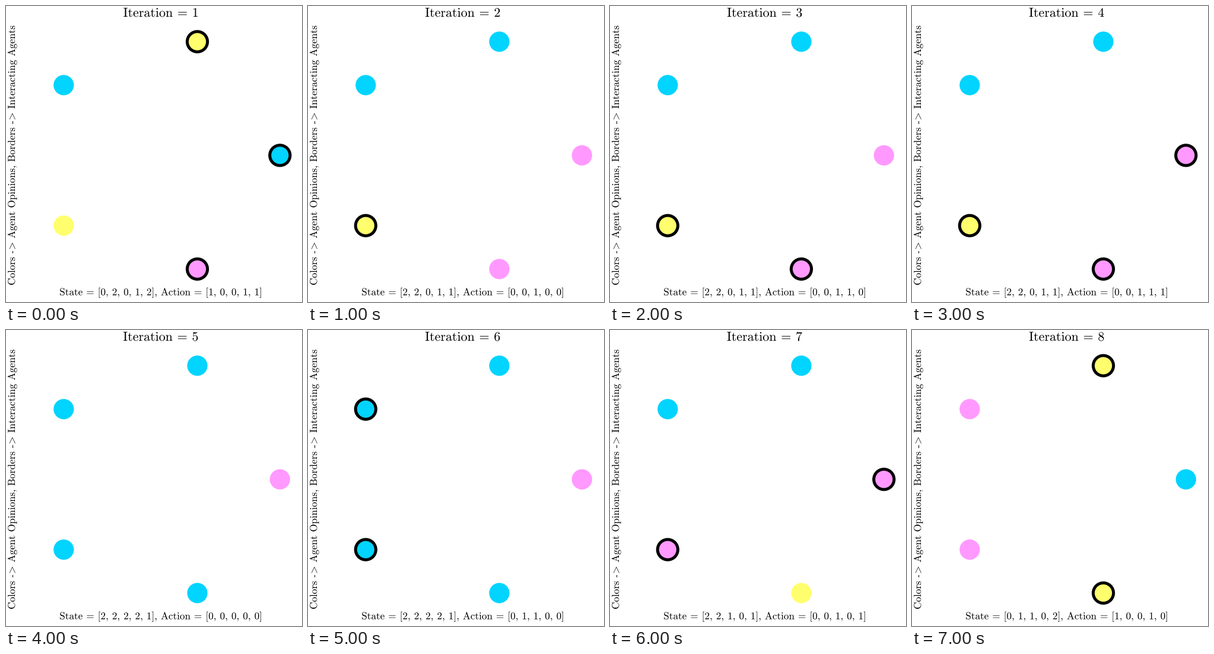
Recreate the animation shown at these times as a matplotlib script. Size 499 by 499 pixels, loop 8000 ms.

```python
import matplotlib.pyplot as plt
import numpy as np
from matplotlib.animation import FuncAnimation
from matplotlib.patches import Circle, PathPatch
from matplotlib.path import Path
from matplotlib.textpath import TextPath
from matplotlib.transforms import Affine2D

plt.rcParams["mathtext.fontset"] = "cm"
plt.rcParams["mathtext.default"] = "rm"

SIZE, DPI = 499, 100
CENTER, RING = (260.3, 251.8), 201.5
RADIUS, BORDER = 17.1, 5
TITLE_SIZE, LABEL_SIZE = 22, 17.17
YELLOW, PINK, CYAN = range(3)
COLORS = ["#ffff6d", "#ff99ff", "#00d4ff"]

# agents, counterclockwise from the top right
A, B, C, D, E = range(5)
START = {A: YELLOW, B: CYAN, C: YELLOW, D: PINK, E: CYAN}
# opinions that change when an iteration begins
SWITCHES = {
    2: {A: CYAN, E: PINK},
    5: {C: CYAN, D: CYAN},
    7: {C: PINK, D: YELLOW},
    8: {A: YELLOW, B: PINK, E: CYAN},
}
INTERACTING = [{A, D, E}, {C}, {C, D}, {C, D, E}, set(), {B, C}, {C, E}, {A, D}]

fig = plt.figure(figsize=(SIZE / DPI, SIZE / DPI), dpi=DPI, facecolor="white")
ax = fig.add_axes([0, 0, 1, 1])
ax.set_xlim(0, SIZE)
ax.set_ylim(SIZE, 0)
ax.axis("off")


def text_path(text, size):
    """Outline of the text in roman type with even word spaces."""
    for old, new in [
        (" -> ", r"\hspace{0.6}>\hspace{0.2}"),  # the hyphen is added apart
        (" = ", r"\hspace{0.2}=\hspace{0.2}"),
        (",", "{,}"),
        (" ", r"\hspace{0.4}"),
    ]:
        text = text.replace(old, new)
    return TextPath((0, 0), f"${text}$", size=size)


def middle(path):
    box = path.get_extents()
    return (box.x0 + box.x1) / 2


def centered(path, x, baseline):
    shift = Affine2D().scale(1, -1).translate(x - middle(path), baseline)
    return path.transformed(shift)


def add_text():
    patch = PathPatch(Path([(0, 0), (0, 0)]), facecolor="black", linewidth=0)
    return ax.add_patch(patch)


def hyphen_after(text):
    """Hyphen one word space behind the text."""
    end = text_path(text, LABEL_SIZE).get_extents().x1
    bar = (Affine2D().scale(0.265, 0.058).translate(0.375, 0.187)
           .scale(LABEL_SIZE).translate(end, 0))
    return Path.unit_rectangle().transformed(bar)


def add_side_label(x, y):
    words = "Colors -> Agent Opinions, Borders -> Interacting Agents"
    path = text_path(words, LABEL_SIZE)
    turn = (Affine2D().translate(-middle(path), 0)
            .rotate_deg(90).scale(1, -1).translate(x, y))
    hyphens = [hyphen_after(words[:i]) for i in range(len(words))
               if words.startswith(" -> ", i)]
    for part in [path, *hyphens]:
        add_text().set_path(part.transformed(turn))


def opinions(iteration):
    state = dict(START)
    for begin, switch in SWITCHES.items():
        if begin <= iteration:
            state.update(switch)
    return [state[k] for k in range(5)]


add_side_label(15.1, 251.7)
title, caption = add_text(), add_text()

agents = []
for k in range(1, 6):
    angle = 2 * np.pi * k / 5
    spot = (CENTER[0] + RING * np.cos(angle), CENTER[1] - RING * np.sin(angle))
    agents.append(ax.add_patch(Circle(spot, RADIUS)))


def draw(i):
    state = opinions(i + 1)
    action = [int(k in INTERACTING[i]) for k in range(5)]
    for agent, opinion, active in zip(agents, state, action):
        agent.set_facecolor(COLORS[opinion])
        agent.set_edgecolor("black" if active else "none")
        agent.set_linewidth(BORDER * 72 / DPI if active else 0)
    heading = text_path(f"Iteration = {i + 1}", TITLE_SIZE)
    title.set_path(centered(heading, 260.6, 18.3))
    footer = text_path(f"State = {state}, Action = {action}", LABEL_SIZE)
    caption.set_path(centered(footer, 260.6, 487.6))
    return [title, caption, *agents]


anim = FuncAnimation(fig, draw, frames=len(INTERACTING), interval=1000,
                     repeat=True, repeat_delay=0)
plt.show()
```
